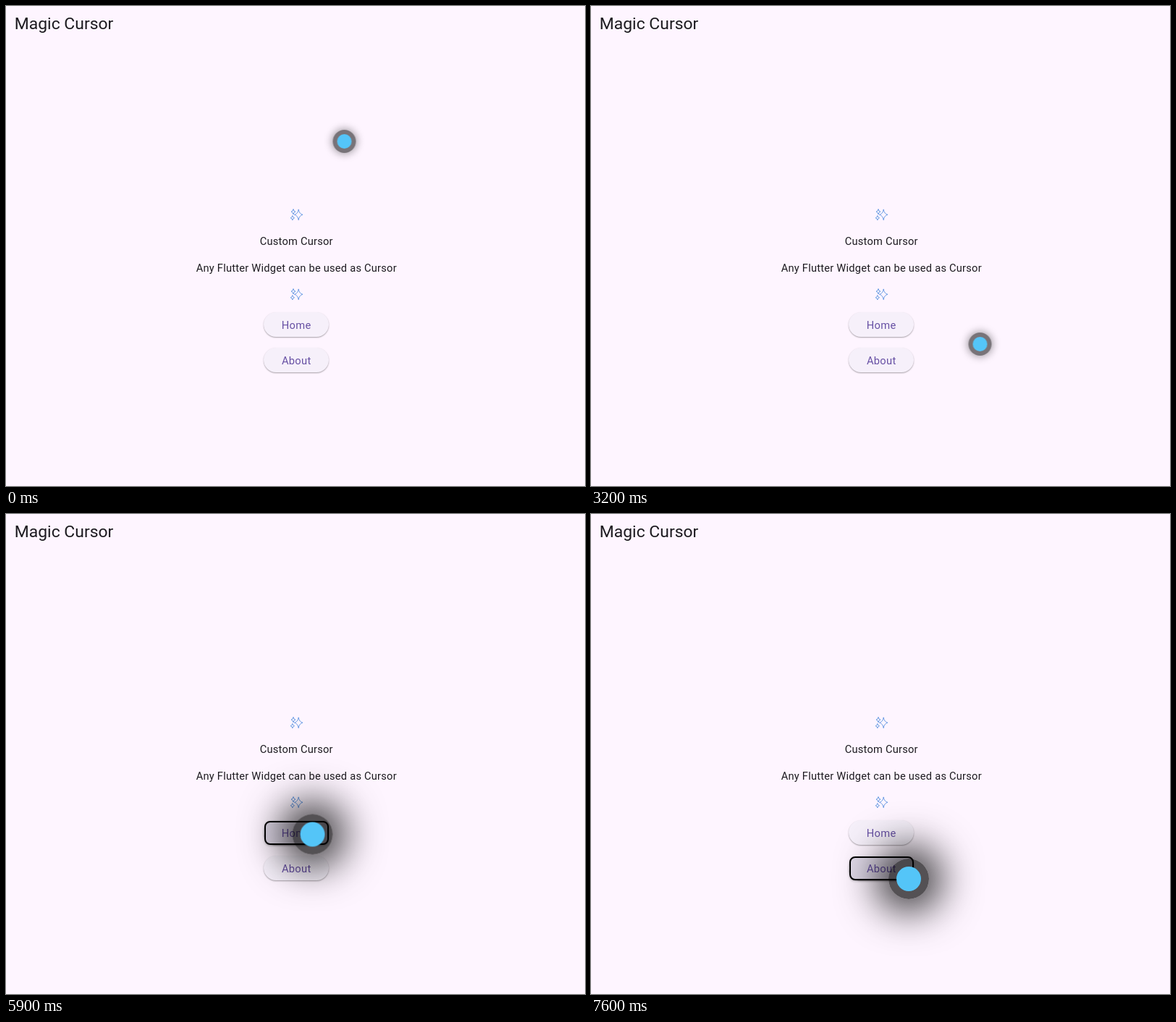
An HTML page for the animation above (8000 ms loop, 800x663 px).

```html
<!DOCTYPE html>
<html lang="en">
<head>
<meta charset="utf-8">
<title>Magic Cursor</title>
<style>
  html, body { margin: 0; width: 100%; height: 100%; overflow: hidden; background: #fef5ff; }
  body { position: relative; }
  svg { position: absolute; left: 0; top: 0; font-family: Roboto, sans-serif; }

  .button, .ring { position: absolute; box-sizing: border-box; }
  .button {
    left: 356px; width: 90px; height: 34px;
    border-radius: 17px; background: #f6f0fa;
    box-shadow: 0 1px 2px rgba(0, 0, 0, .28), 0 1px 1px rgba(0, 0, 0, .08);
  }
  .ring {
    left: 356.5px; width: 89.5px; height: 33px; margin-top: 1px;
    border: 2px solid #000; border-radius: 8px; background: #e1dae9;
    box-shadow: 0 1px 3px rgba(0, 0, 0, .3); visibility: hidden;
    animation: 8s step-end infinite;
  }
  .home { top: 423px; }
  .about { top: 472px; }
  .ring.home { animation-name: hover-home; }
  .ring.about { animation-name: hover-about; }

  .title { font-size: 22.95px; fill: #1d1b20; }
  .body { font-size: 14.65px; letter-spacing: .23px; fill: #1d1b20; }
  .label { font-size: 14.7px; letter-spacing: .3px; fill: #6750a4; }
  .body, .label { text-anchor: middle; }

  .cursor { position: absolute; left: 0; top: 0; animation: move 8s infinite; }
  .disc {
    position: absolute; width: 32px; height: 32px; border-radius: 50%;
    transform: translate(-50%, -50%); animation: grow 8s infinite;
  }
  .disc::after {
    content: ""; position: absolute; inset: 19%; border-radius: 50%; background: #54c5f8;
  }

  /* The pointer advances in 100 ms hops, so each segment has one step per hop. */
  @keyframes move {
    0%     { transform: translate(467.5px, 187px); animation-timing-function: step-end; }
    22.5%  { transform: translate(467.5px, 187px); animation-timing-function: steps(4); }
    27.5%  { transform: translate(543.5px, 352px); animation-timing-function: steps(2); }
    30%    { transform: translate(546px, 402px);   animation-timing-function: steps(3); }
    33.75% { transform: translate(541px, 460px);   animation-timing-function: steps(5); }
    40%    { transform: translate(537.5px, 467px); animation-timing-function: steps(4); }
    45%    { transform: translate(537px, 467px);   animation-timing-function: steps(6); }
    52.5%  { transform: translate(454px, 442.5px); animation-timing-function: steps(3); }
    56.25% { transform: translate(428px, 442.5px); animation-timing-function: steps(9); }
    67.5%  { transform: translate(423.5px, 442.5px); animation-timing-function: step-end; }
    73.75% { transform: translate(423.5px, 442.5px); animation-timing-function: steps(3); }
    77.5%  { transform: translate(434px, 465px);   animation-timing-function: steps(4); }
    82.5%  { transform: translate(437px, 495px);   animation-timing-function: steps(9); }
    93.75%, 100% { transform: translate(439px, 504px); animation-timing-function: step-end; }
  }
  @keyframes grow {
    0%, 48.75% {
      width: 32px; height: 32px; background: rgba(0, 0, 0, .53);
      box-shadow: 0 0 12px 1px rgba(0, 0, 0, .4); animation-timing-function: steps(3);
    }
    52.5%, 100% {
      width: 56px; height: 56px; background: rgba(0, 0, 0, .67);
      box-shadow: 0 0 54px 18px rgba(0, 0, 0, .78);
    }
  }
  @keyframes hover-home {
    0%, 76.25% { visibility: hidden; }
    50% { visibility: visible; }
  }
  @keyframes hover-about {
    0% { visibility: hidden; }
    76.25%, 100% { visibility: visible; }
  }
</style>
</head>
<body>
  <div class="button home"></div>
  <div class="button about"></div>
  <div class="ring home"></div>
  <div class="ring about"></div>

  <svg width="800" height="663" viewBox="0 0 800 663">
    <defs>
      <path id="star" d="M0-1Q.15-.15 1 0Q.15.15 0 1Q-.15.15-1 0Q-.15-.15 0-1Z"
            fill="none" stroke="#6a9be3" stroke-linejoin="round" vector-effect="non-scaling-stroke"/>
      <g id="sparkles">
        <use href="#star" transform="translate(3.2 .3) scale(5.8 7.4)"/>
        <use href="#star" transform="translate(-4 -3.8) scale(3 3.7)"/>
        <use href="#star" transform="translate(-5.2 4.7) scale(2.7 3.2)"/>
      </g>
    </defs>
    <text class="title" x="11.7" y="32">Magic Cursor</text>
    <use href="#sparkles" x="401" y="288"/>
    <text class="body" x="401.3" y="330">Custom Cursor</text>
    <text class="body" x="401.3" y="367">Any Flutter Widget can be used as Cursor</text>
    <use href="#sparkles" x="401" y="398"/>
    <text class="label" x="401.2" y="446">Home</text>
    <text class="label" x="401.2" y="495">About</text>
  </svg>

  <div class="cursor"><div class="disc"></div></div>
</body>
</html>
```
